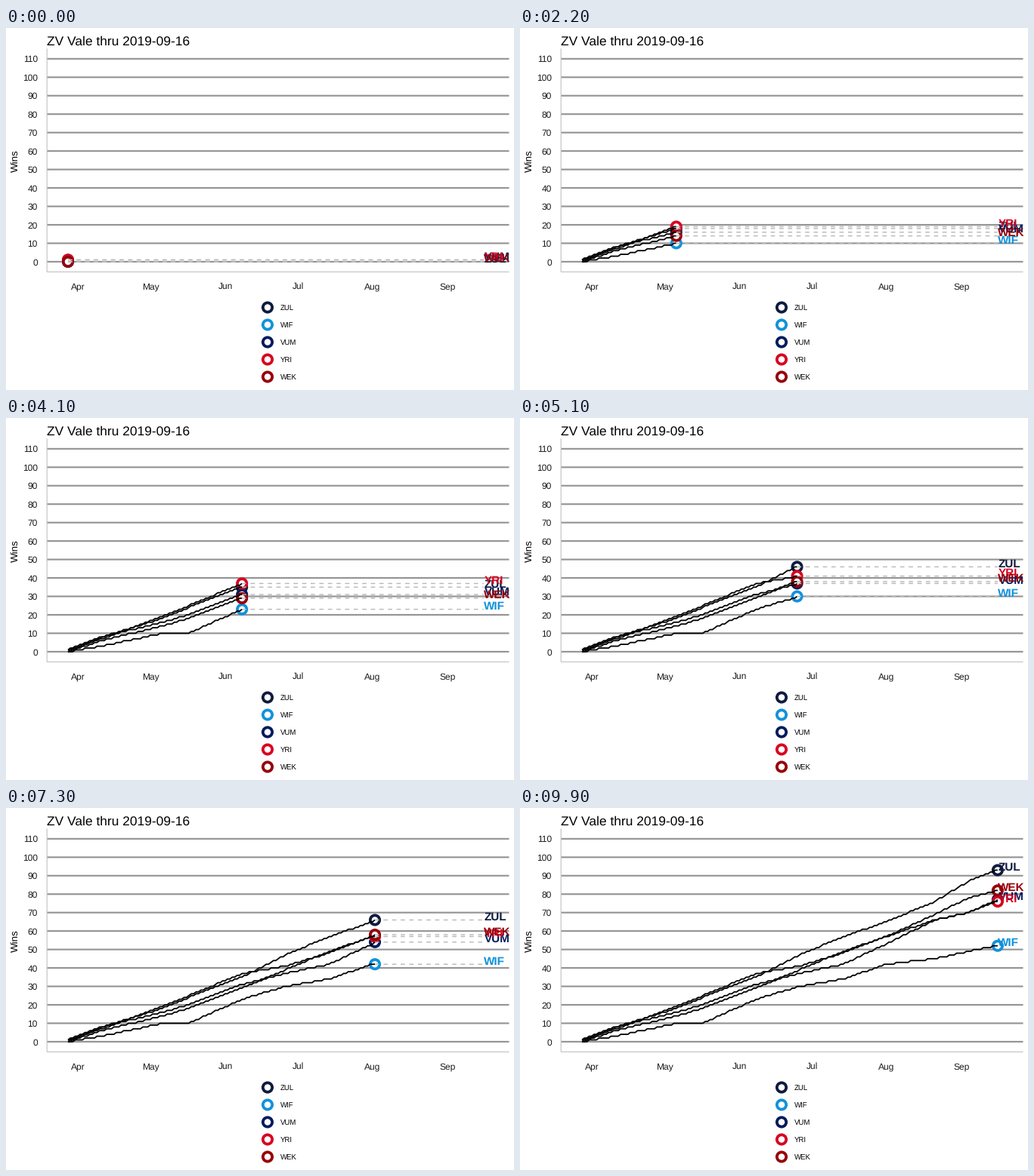
Write a matplotlib script that moves like this. It is 672 by 480 pixels and loops after 10 s.

```python
import numpy as np
import matplotlib.pyplot as plt
from matplotlib.animation import FuncAnimation
from matplotlib.patches import Circle, Rectangle

W, H, DPI = 672, 480, 96
FRAMES, INTERVAL = 100, 100
LAST_DAY = 172
LEFT, RIGHT, TOP, BOTTOM = 54.2, 665.5, 27.3, 323.4
INK, AXIS, GRID, GUIDE = "#1a1a1a", "#bebebe", "#949494", "#b9b9b9"

plt.rcParams.update({"font.family": "Liberation Sans",
                     "path.snap": False,
                     "text.hinting": "none"})

# Season totals on a few key days; days between are interpolated
KEY_DAYS = [0, 14, 39, 50, 72, 90, 108, 126, 146, 160, 172]
TEAMS = [
    ("ZUL", "#0f1b3e", [0, 8, 18, 24, 35, 47, 57, 65, 76, 87, 93]),
    ("WIF", "#1192dc", [0, 3, 10, 10, 23, 30, 34, 42, 45, 49, 52]),
    ("VUM", "#021b5c", [1, 8, 16, 20, 31, 37, 42, 53, 66, 70, 77]),
    ("YRI", "#d80321", [1, 7, 19, 25, 37, 41, 48, 57, 66, 70, 76]),
    ("WEK", "#960009", [0, 6, 14, 18, 29, 39, 49, 57, 69, 78, 82]),
]


def px(n):
    """Pixels to points."""
    return n * 72 / DPI


def day_x(day):
    return 82 + 3.197 * day


def win_y(wins):
    return 309.9 - 2.446 * wins


def line(xs, ys, color, width, **kw):
    return page.plot(xs, ys, color=color, lw=px(width),
                     solid_capstyle="butt", dash_capstyle="butt", **kw)[0]


def ring(x, y, color, **kw):
    return page.add_patch(Circle((x, y), 6.16, fc="white", ec=color,
                                 lw=px(3.78), **kw))


def text(x, y, s, size, **kw):
    return page.text(x, y, s, size=px(size), **kw)


fig = plt.figure(figsize=(W / DPI, H / DPI), dpi=DPI, facecolor="white")
page = fig.add_axes([0, 0, 1, 1])
page.set(xlim=(0, W), ylim=(H, 0))
page.axis("off")
panel = Rectangle((LEFT, TOP), RIGHT - LEFT, BOTTOM - TOP,
                  transform=page.transData)

# Titles, grid and axes
text(54, 23, "ZV Vale thru 2019-09-16", 17.33)
text(15.8, 176, "Wins", 13.33, rotation=90, rotation_mode="anchor",
     ha="center", va="baseline")
for wins in range(0, 111, 10):
    y = win_y(wins)
    line([LEFT, RIGHT], [y, y], GRID, 2.13, zorder=1)
    text(41.8, y + 4.5, wins, 12, color=INK, ha="right")
line([LEFT, LEFT], [TOP, BOTTOM], AXIS, 1.07, zorder=1)
line([LEFT, RIGHT], [BOTTOM, BOTTOM], AXIS, 1.07, zorder=1)

day = 4
for month, length in zip("Apr May Jun Jul Aug Sep".split(),
                         [30, 31, 30, 31, 31, 30]):
    text(day_x(day) + 0.3, 346.3, month, 12, color=INK, ha="center")
    day += length

# Legend and moving parts
season = np.arange(LAST_DAY + 1)
tracks = []
for i, (code, color, wins) in enumerate(TEAMS):
    y = 370.5 + 23 * i
    ring(346, y, color)
    text(363, y + 3.6, code, 9.6)

    total = np.floor(np.interp(season, KEY_DAYS, wins) + 0.5)
    dot = ring(0, 0, color, zorder=2 + i / 10)
    path = line([], [], "black", 1.8, zorder=3)
    guide = line([], [], GUIDE, 1.42, zorder=4, dashes=(4, 4))
    label = text(day_x(LAST_DAY) + 0.6, 0, code, 15.2, color=color,
                 weight="bold", zorder=5 + i / 10)
    label.set_clip_path(panel)
    label.set_clip_on(True)
    tracks.append((total, dot, path, guide, label))


def update(frame):
    # Last whole day that rounds to this step of the season
    today = min(int((frame + 0.5) * LAST_DAY / (FRAMES - 1)), LAST_DAY)
    x, end = day_x(today), day_x(LAST_DAY)
    for total, dot, path, guide, label in tracks:
        y = win_y(total[today])
        dot.center = x, y
        path.set_data(day_x(season[:today + 1]), win_y(total[:today + 1]))
        guide.set_data([x, end], [y, y])
        label.set_y(y + 0.5)
    return [artist for track in tracks for artist in track[1:]]


anim = FuncAnimation(fig, update, frames=FRAMES, interval=INTERVAL,
                     repeat=True, repeat_delay=0, blit=False)
plt.show()
```
